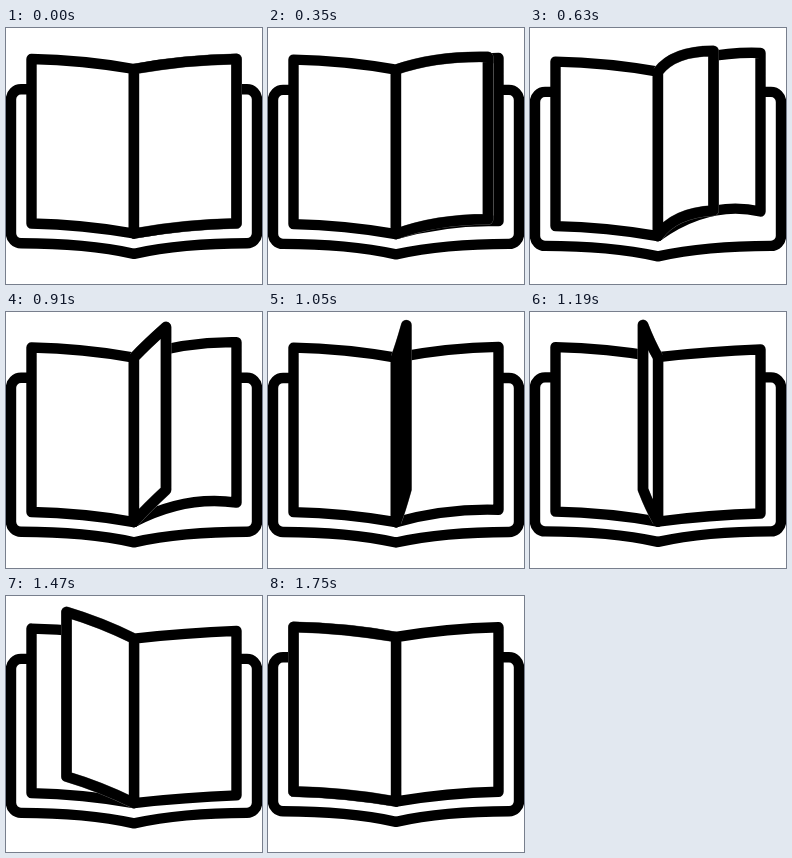
These frames come from a looping animation (256x256 px, 1.96 s). An HTML page with a canvas:

```html
<!DOCTYPE html>
<html>
<head>
<meta charset="utf-8">
<style>
html, body { margin: 0; width: 100%; height: 100%; overflow: hidden; background: #fff; }
canvas { display: block; }
</style>
</head>
<body>
<canvas id="stage" width="256" height="256"></canvas>
<script>
const ctx = document.getElementById('stage').getContext('2d');
const LOOP = 1960, TICK = 70, REST = 210;
const SPINE = 128, LEFT = 25.5, RIGHT = 230.5, TOP = 31, HEIGHT = 164.5, LINE = 10.4;

// Path of the turning page's upper corner, in equal time steps
const cornerX = [RIGHT, 220, 183.5, 160, 113, 60.5, LEFT];
const cornerY = [TOP, 29, 23, 15, 13, 16, TOP];

// Smooth curve through equally spaced points, at rest at both ends
function along(points, s) {
  const last = points.length - 1;
  const i = Math.min(last - 1, Math.floor(s)), u = s - i, v = 1 - u;
  const slope = j => j % last ? (points[j + 1] - points[j - 1]) / 2 : 0;
  return points[i] * (1 + 2 * u) * v * v + points[i + 1] * (3 - 2 * u) * u * u +
    u * v * (slope(i) * v - slope(i + 1) * u);
}

const hump = (s, centre) => Math.exp(-((s - centre) ** 2));

function stroke(path, color = '#000', width = LINE) {
  ctx.strokeStyle = color;
  ctx.lineWidth = width;
  ctx.stroke(path);
}

function cover(sink) {
  stroke(new Path2D(`M30 ${61.3 + sink}H15a10 10 0 0 0-10 10v134a10 10 0 0 0 10 10q65 0 113 10.5
    q48-10.5 113-10.5a10 10 0 0 0 10-10v-134a10 10 0 0 0-10-10H226`));
}

// Bends lift the middle of the upper and lower edges; lean shifts them sideways
function page(sink, x, top, bottom, bendTop = 4, bendBottom = bendTop, lean = 0, seam = false) {
  const spineTop = 41 + sink, spineBottom = 205.5 + sink;
  const midX = (SPINE + x) / 2 - lean;
  const p = new Path2D();
  p.moveTo(SPINE, spineTop);
  p.quadraticCurveTo(midX, (spineTop + top) / 2 - bendTop, x, top);
  p.lineTo(x, bottom);
  p.quadraticCurveTo(midX, (spineBottom + bottom) / 2 - bendBottom, SPINE, spineBottom);
  ctx.fillStyle = '#fff';
  ctx.fill(p);
  if (seam) stroke(p, '#777', LINE + 0.5);
  p.closePath();
  stroke(p);
}

function draw(now) {
  const time = Math.floor((now % LOOP) / TICK) * TICK;
  const s = time < REST ? 0 : Math.min(6, (time - TICK) / 280);

  const sink = 4.7 * Math.sin(Math.PI * (s / 6) ** 1.2) ** 2;
  const pull = hump(s, 2.3), release = hump(s, 4.4), curl = hump(s, 1.9);
  const rise = 9.5 * pull - 3.3 * release;
  const x = along(cornerX, s), y = along(cornerY, s);
  const top = TOP + sink, bottom = top + HEIGHT;

  ctx.clearRect(0, 0, 256, 256);
  ctx.lineJoin = 'round';
  cover(sink);
  page(sink, LEFT, top, bottom);
  page(sink, RIGHT, top - rise, bottom - rise - 6.5 * pull,
    4 + 8 * pull - 3 * release, 4 + 22 * pull - 3 * release);
  const bend = 4 + 8 * curl - 10 * hump(s, 3.4);
  page(sink, x, y, y + HEIGHT - 5 * curl, bend, bend, 12 * curl, true);
}

const start = performance.now();
function loop() {
  draw(performance.now() - start);
  requestAnimationFrame(loop);
}
loop();
</script>
</body>
</html>
```
